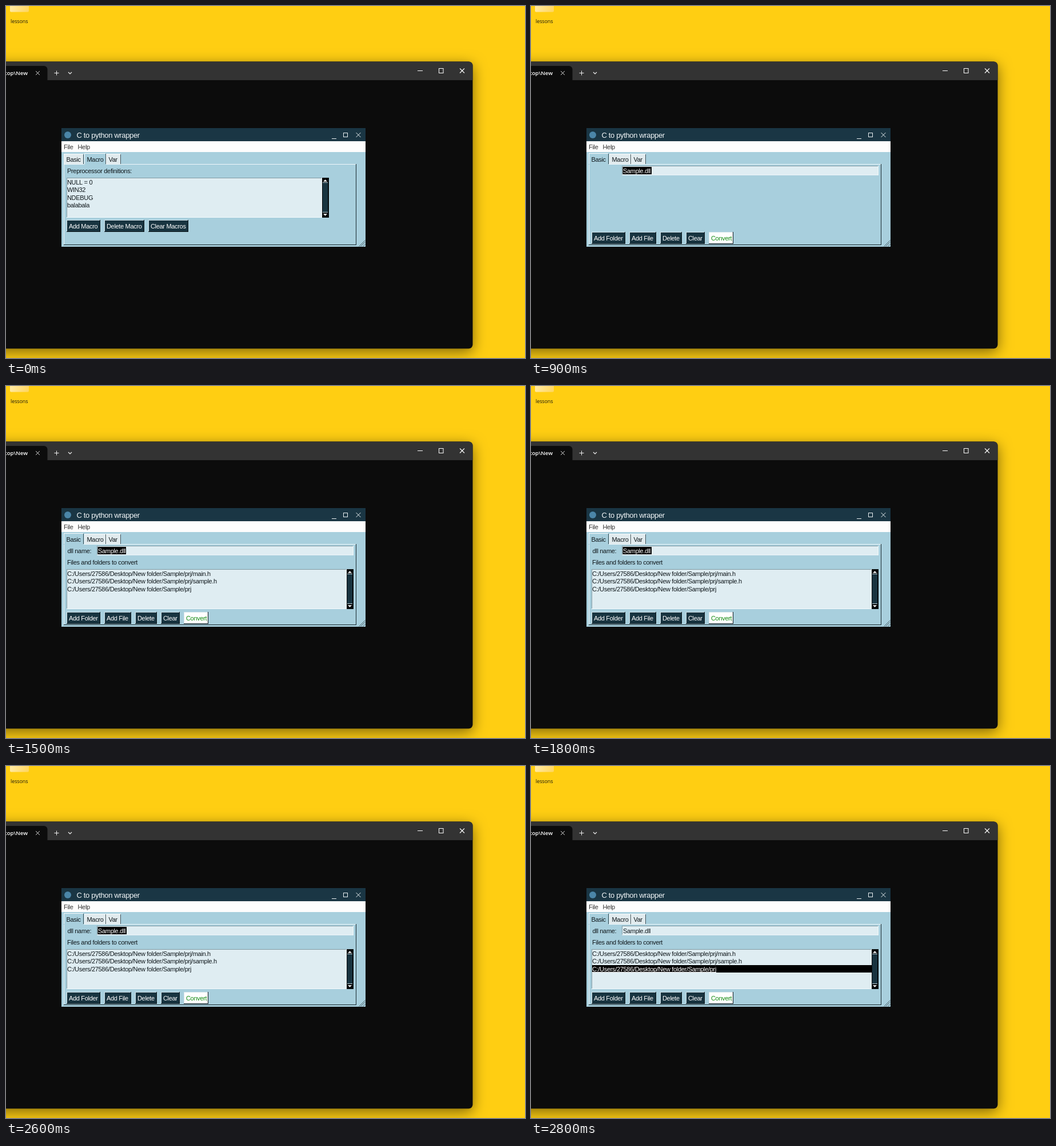
An HTML page with a canvas for the animation above (8000 ms loop, 908 px wide and 617 px high).

```html
<!DOCTYPE html>
<html lang="en">
<head>
<meta charset="utf-8">
<title>C to python wrapper</title>
<style>
  html, body { margin: 0; width: 100%; height: 100%; overflow: hidden; background: #ffce12; }
  canvas { display: block; width: 908px; height: 617px; }
</style>
</head>
<body>
<canvas id="stage" width="908" height="617"></canvas>
<script>
const ctx = document.getElementById('stage').getContext('2d');
const LOOP = 8000;
const BG = '#a8cfdd', INPUT = '#dfedf2', DARK = '#183440', INK = '#10181c';
const SANS = '"Liberation Sans", Arial, sans-serif';
const UI = '"Open Sans", "Noto Sans", sans-serif';
const ROOT = 'C:/Users/27586/Desktop/New folder/Sample/prj';

function rect(x, y, w, h, color) {
  ctx.fillStyle = color;
  ctx.fillRect(x, y, w, h);
}

function round(x, y, w, h, radii, color) {
  ctx.fillStyle = color;
  ctx.beginPath();
  ctx.roundRect(x, y, w, h, radii);
  ctx.fill();
}

function line(color, width, ...pts) {
  ctx.strokeStyle = color;
  ctx.lineWidth = width;
  ctx.beginPath();
  for (let i = 0; i < pts.length; i += 2) ctx.lineTo(pts[i], pts[i + 1]);
  ctx.stroke();
}

function cross(x, y, r, color, width = 1) {
  line(color, width, x - r, y - r, x + r, y + r);
  line(color, width, x - r, y + r, x + r, y - r);
}

function text(str, x, y, color = INK, font = '11px ' + SANS, spacing = '-0.32px') {
  ctx.font = font;
  ctx.letterSpacing = spacing;
  ctx.fillStyle = color;
  ctx.fillText(str, x, y);
}

// One pixel bevel: top and left in one colour, bottom and right in another.
function bevel(x, y, w, h, light, dark) {
  rect(x, y, w, 1, light);
  rect(x, y, 1, h, light);
  rect(x, y + h - 1, w, 1, dark);
  rect(x + w - 1, y, 1, h, dark);
}

function desktop() {
  rect(0, 0, 908, 617, '#ffce12');
  const g = ctx.createLinearGradient(7, 0, 40, 11);
  g.addColorStop(0, '#ffeaa6');
  g.addColorStop(1, '#ffd55c');
  round(7, -8, 33, 18.5, 2, g);
  text('lessons', 8, 30, '#1c1a10', '9px ' + UI, '-0.1px');
}

function terminal() {
  ctx.save();
  ctx.shadowColor = 'rgba(0,0,0,.5)';
  ctx.shadowBlur = 24;
  ctx.shadowOffsetY = 6;
  round(-40, 97.5, 856.5, 503, 7, '#0c0c0c');
  ctx.restore();
  round(-40, 97.5, 856.5, 32.5, [7, 7, 0, 0], '#333333');
  round(-20, 105, 92.5, 25, [6, 6, 0, 0], '#0c0c0c');
  ctx.textAlign = 'right';
  text('top\\New', 38, 121, '#ffffff', '600 9.6px ' + UI, '0px');
  ctx.textAlign = 'left';
  cross(55.5, 117.5, 3.3, '#e8e8e8');
  line('#f0f0f0', 1, 84.5, 117.5, 92.5, 117.5);
  line('#f0f0f0', 1, 88.5, 113.5, 88.5, 121.5);
  line('#f0f0f0', 1.2, 109, 116, 112, 119, 115, 116);
  line('#ffffff', 1, 720, 113.5, 729, 113.5);
  ctx.strokeRect(757.5, 109.5, 7.5, 8);
  cross(798, 113.5, 4, '#ffffff', 1.1);
}

function dialog() {
  rect(97, 214, 532, 208, BG);
  rect(97, 214, 532, 23, '#1a3644');
  ctx.fillStyle = '#4b86a8';
  ctx.beginPath();
  ctx.arc(108, 226, 6, 0, 7);
  ctx.fill();
  text('C to python wrapper', 123.5, 230.5, '#f2f6f8', '13px ' + SANS, '-0.36px');
  line('#e8eef0', 1, 570, 232.5, 578, 232.5);
  ctx.strokeRect(590.5, 222.5, 7, 7);
  cross(616.5, 226, 4, '#e8eef0');
  rect(97, 237, 532, 19, '#fdfdfd');
  text('File', 101, 250.5, '#333');
  text('Help', 125.5, 250.5, '#333');
  for (const d of [4, 8, 11]) line('#4c626b', 1, 628.5 - d, 421.5, 628.5, 421.5 - d);
}

function tabs(active) {
  bevel(101, 277, 512, 142, '#eef7fa', '#18292f');
  const list = [['Basic', 101, 35, 105.5], ['Macro', 137, 38, 141.5], ['Var', 175, 26, 179.5]];
  for (const [name, x, w, tx] of list) {
    const on = name === active;
    const top = on ? 258 : 259;
    rect(x, top, w, on ? 20 : 18, on ? BG : '#e1ebee');
    rect(x, top, w - 1, 1, '#f7fbfc');
    rect(x, top, 1, 277 - top, '#f7fbfc');
    rect(x + w - 1, top + 1, 1, 276 - top, '#40535a');
    text(name, tx, 272.5);
  }
}

function button(label, x, y, w, bg = DARK, fg = '#ffffff') {
  rect(x, y, w, 21, bg);
  bevel(x, y, w, 21, '#d4e4ea', '#0a1418');
  text(label, x + 4, y + 14.5, fg);
}

function field(x, y, w, h) {
  rect(x, y, w, h, INPUT);
  bevel(x, y, w, h, '#819aa3', '#f4fafc');
}

function arrow(x, y, dir) {
  ctx.fillStyle = '#ffffff';
  ctx.beginPath();
  ctx.moveTo(x - 3.5, y + dir * 1.8);
  ctx.lineTo(x + 3.5, y + dir * 1.8);
  ctx.lineTo(x, y - dir * 1.8);
  ctx.fill();
}

function listbox(y, w, rows, picked = -1, underline = false) {
  field(106, y, w, 70);
  rows.forEach((row, i) => {
    const base = y + 11.5 + i * 13.6;
    const on = i === picked;
    if (on) rect(107, Math.round(base - 11), w - 1, 13, '#000000');
    text(row, 107, base, on ? '#ffffff' : INK);
    if (on && underline) rect(107, Math.round(base + 1), ctx.measureText(row).width, 1, '#ffffff');
  });
  const x = 106 + w;
  rect(x, y, 12, 70, '#050a0c');
  rect(x + 1, y + 9, 9, 51, DARK);
  rect(x + 1, y + 8, 9, 1, '#b8ccd4');
  rect(x + 1, y + 60, 9, 1, '#b8ccd4');
  arrow(x + 5.5, y + 5, 1);
  arrow(x + 5.5, y + 65, -1);
}

function macroPage() {
  tabs('Macro');
  text('Preprocessor definitions:', 107, 292.5);
  listbox(301, 447, ['NULL = 0', 'WIN32', 'NDEBUG', 'balabala']);
  button('Add Macro', 106, 375, 59);
  button('Delete Macro', 172, 375, 70);
  button('Clear Macros', 249, 375, 70);
}

function basicPage(t) {
  const clicked = t >= 2700;
  tabs('Basic');
  field(159, 280, 449, 16.5);
  if (!clicked) rect(160.5, 282, 49.5, 13, '#000000');
  text('Sample.dll', 161, 292.5, clicked ? INK : '#ffffff');
  const caretOff = (t >= 1500 && t < 1800) || (t >= 2300 && t < 2600);
  if (!clicked && !caretOff) rect(209.5, 282, 1.5, 13, '#000000');
  if (t >= 1000) {
    text('dll name:', 107.5, 292.5);
    text('Files and folders to convert', 107, 313);
    listbox(321, 490, [ROOT + '/main.h', ROOT + '/sample.h', ROOT], clicked ? 2 : -1, t >= 2700);
  }
  button('Add Folder', 106, 396, 59);
  button('Add File', 172, 396, 47);
  button('Delete', 226, 396, 38);
  button('Clear', 271, 396, 33);
  button('Convert', 311, 396, 43, '#ffffff', '#128a12');
}

function frame(now) {
  const t = now % LOOP;
  desktop();
  terminal();
  dialog();
  if (t < 900) macroPage();
  else basicPage(t);
  requestAnimationFrame(frame);
}
requestAnimationFrame(frame);
</script>
</body>
</html>
```
